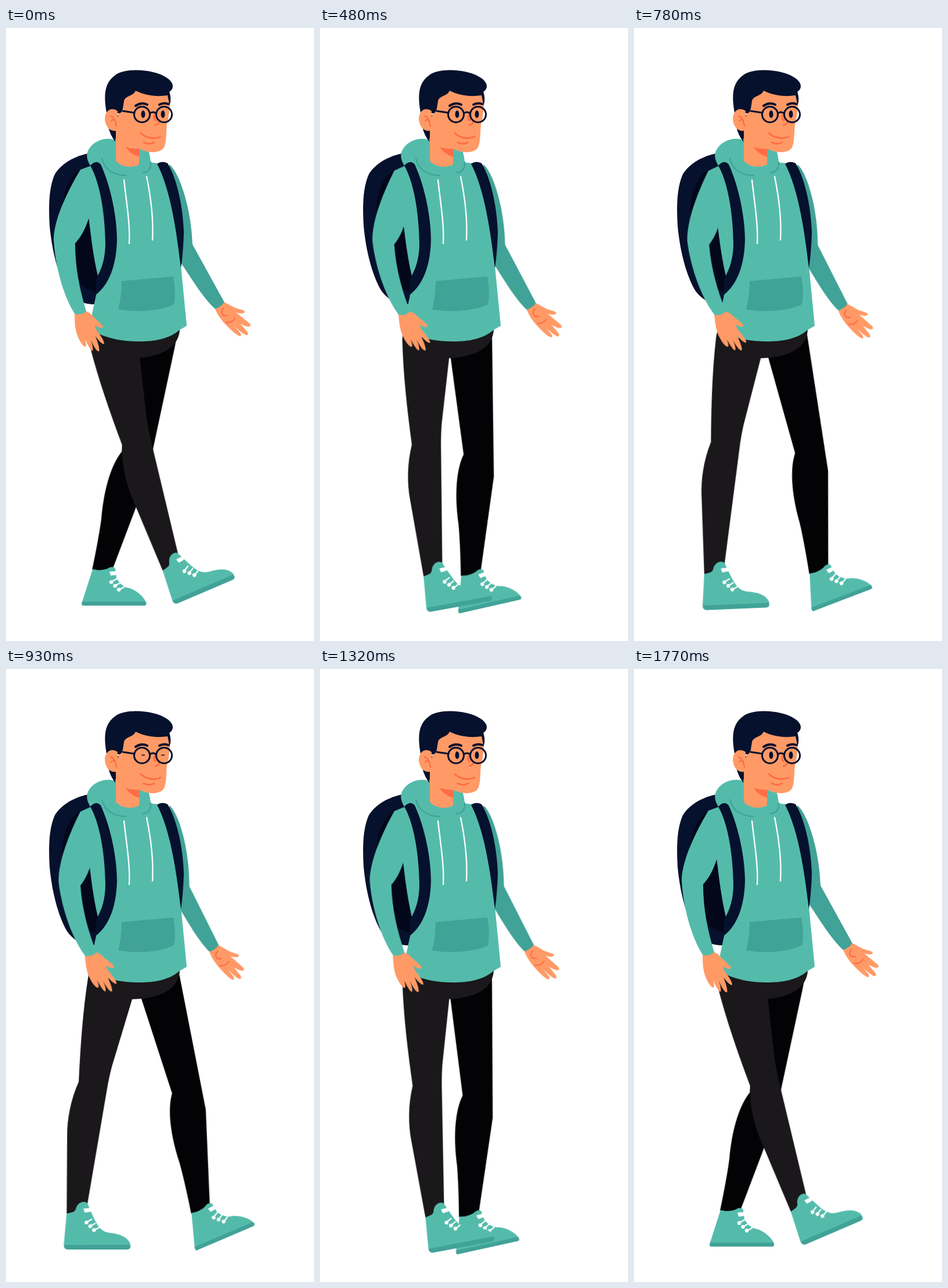
Write an HTML page that moves like this. It is 530 px wide and 1056 px high and loops after 1.8 s.

```html
<!DOCTYPE html>
<html lang="en">
<head>
<meta charset="utf-8">
<title>Walking student</title>
<style>
  html, body { margin: 0; width: 100%; height: 100%; overflow: hidden; background: #fff; }
  svg { display: block; width: 530px; height: 1056px; }

  .teal { fill: #54bbab; }
  .shade { fill: #41a297; }
  .navy { fill: #06112d; }
  .deep { fill: #03071a; }
  .skin { fill: #ff9a66; }
  .near-cloth { fill: #1a181a; }
  .far-cloth { fill: #030305; }
  .line { fill: none; stroke-linecap: round; stroke-linejoin: round; stroke-width: 3; }
  .thin { stroke-width: 2.3; }
  .thick { stroke-width: 4; }
  .fold { stroke: #41a297; }
  .blush { stroke: #ff6c46; }
  .ink { stroke: #06112d; }
  .white { stroke: #fff; }

  .leg, .arm, .eyes { animation: 1800ms infinite; }
  .leg { animation-name: stride; animation-timing-function: linear; }
  .arm { animation-timing-function: cubic-bezier(.3333, 0, .6667, 1); }
  .near.leg { --start: -23.2deg; --end: .8deg; transform-origin: 179px 532.5px; }
  .far.leg { --start: 23.2deg; --end: -.8deg; transform-origin: 246px 519px; }
  .near.arm { animation-name: near-arm; transform-origin: 151px 246px; }
  .far.arm { animation-name: far-arm; transform-origin: 283px 240px; }
  .eyes { animation-name: blink; animation-timing-function: linear; transform-origin: 253px 148.5px; }

  @keyframes stride {
    0%, 98.333%, 100% { transform: rotate(var(--start)); }
    50% { transform: rotate(var(--end)); }
  }
  @keyframes near-arm {
    0%, 98.333%, 100% { transform: rotate(0deg); }
    36.667% { transform: rotate(-4.85deg); }
  }
  @keyframes far-arm {
    0%, 98.333%, 100% { transform: rotate(0deg); }
    61.667% { transform: rotate(2.5deg); }
  }
  @keyframes blink {
    0%, 46.667%, 56.667%, 100% { transform: scaleY(1); }
    51.667% { transform: scaleY(.15); }
  }
</style>
</head>
<body>
<svg viewBox="0 0 530 1056">
  <defs>
    <path id="tag" fill="#fff" d="M133 929.500L145 928.500L145.500 935L135 936.500Z"/>
    <g id="laces">
      <path class="line thin white" d="M138 953L147 948M144 960L153 955M151 967L160 962"/>
      <g fill="#fff"><circle cx="138" cy="953.500" r="3.200"/><circle cx="144.500" cy="960" r="3.200"/><circle cx="151" cy="966.500" r="3.200"/></g>
    </g>
  </defs>

  <!-- backpack -->
  <path class="navy" d="M142 216C112 222 92 238 84 252C74 274 73 305 75 340C79 385 90 425 104 450C114 466 130 476 152 476L162 450L165 240Z"/>
  <path class="deep" d="M130 243C108 256 98 282 97 315C98 370 110 415 131 443Q142 453 160 455V240Z"/>

  <g class="far arm">
    <path class="skin" d="M360 484C364 495 373 506 382 515C390 523 398 530 403 531Q406 529 403 525L393 514C401 521 410 529 415 529Q418 527 415 523L403 509C410 513 417 516 420 514Q422 511 418 508L396 490C402 492 410 493 411 489C410 485 400 485 390 480C384 476 380 475 375 472Z"/>
    <path class="line thin blush" d="M374 483C367 491 374 498 381 495M379 507C386 508 391 505 394 500"/>
    <path class="shade" d="M281 235C298 248 319 310 321 373L375.500 472Q371 480 360 484C340 466 320 433 302 406L280 300Z"/>
  </g>

  <g class="far leg">
    <path class="far-cloth" d="M290 490L299 530L344 759L351 922L345 940L319 938C314 912 306 876 299 851C281 796 279 755 286 731L233 568L225 510Z"/>
    <g transform="rotate(-23.2 246 519)">
      <path class="teal" d="M149 932C158 935 168 934 175 931C181 927 187 928 188 932L190 948C198 961 205 964 213 965C228 971 239 982 241 991H130Z"/>
      <path class="shade" d="M131 988H240Q244 995 236 995H132Q129 995 131 988Z"/>
      <use href="#tag" x="45" y="7"/>
      <use href="#laces" x="43" y="1"/>
    </g>
  </g>

  <path class="near-cloth" d="M160 500H299V520C297 548 272 568 215 569L175 560Z"/>

  <g class="near leg">
    <path class="near-cloth" d="M160 505Q143 515 141 533C132 591 128 650 125 711C111 742 105 775 105 803L104 945H136L140 920L175 716Q178 700 182 685L217 569L230 530Z"/>
    <path class="teal" d="M104 938C112 936 119 936 120 929C124 917 136 915 140 921C143 928 146 936 150 944C156 958 163 969 176 971C197 973 211 980 214 992H99Z"/>
    <path class="shade" d="M99 992H213Q216 1000 206 1000H106Q99 1000 99 992Z"/>
    <use href="#tag"/>
    <use href="#laces"/>
  </g>

  <!-- hoodie -->
  <path class="teal" d="M146 237L190 225L262 233L278 233C296 262 305 315 304 352L301 410L311 513L299 520C280 536 256 540 228 540C204 540 180 536 160 527Q150 514 148 493L155 460L158 427C149 388 146 355 142 325L140 245Z"/>
  <path class="shade" d="M199 436L288 428Q293 456 289 476C265 488 227 490 193 485Q199 461 199 436Z"/>
  <path class="navy" d="M260 234Q268 228 278 233C296 262 305 315 306 352Q305 386 301 414C294 355 284 280 260 234Z"/>

  <g class="near arm">
    <path class="skin" d="M118 490C118 508 119 520 123 530C126 538 132 549 137 549Q139 547 136 536C140 545 146 557 149 556Q151 552 146 537C150 547 156 558 160 557Q162 552 154 531C159 538 166 546 169 544Q169 538 157 522L152 512C158 515 165 519 167 515C165 509 155 503 150 497Q144 490 138 488Z"/>
    <path class="teal" d="M128 244C108 278 84 325 82 362C84 410 99 462 118 492Q129 496 138 488C127 450 119 415 119 371C130 359 137 344 142 329L160 310L162 255L147 237Z"/>
  </g>

  <path class="teal" d="M145 237C135 221 139 210 150 200C163 190 181 188 191 195L215 225L228 203L244 208C247 215 249 226 249 235C248 247 241 250 234 250L200 255Z"/>
  <path class="navy" d="M145 237Q155 226 163 235C181 274 191 328 191 365C190 408 178 442 154 460L155 432C166 413 171 395 171 370C170 315 161 265 145 237Z"/>
  <path class="line thin fold" d="M165 225C170 246 188 254 206 254M249 231C250 243 244 249 235 249"/>
  <path class="line thin white" d="M203 262C207 298 214 340 212 371M242 256C250 295 254 330 252 365"/>

  <!-- head -->
  <path class="navy" d="M176 170Q179 184 188 196L194 150H174Z"/>
  <path class="skin" d="M189 165V229C199 240 217 242 229 235V208C242 215 258 216 268 210C277 204 275 184 277 166C281 152 283 132 282 110L224 104L202 118Z"/>
  <path fill="#ff6c46" d="M206 205Q218 209 229 208V222Q213 217 206 205Z"/>
  <path class="navy" d="M173 146C167 112 171 94 187 82C201 70 233 71 253 76C274 81 287 91 287 100Q287 106 281 110C284 119 284 127 281 134Q280 124 278 116C258 119 239 116 223 108C219 118 205 116 203 126C201 138 201 147 194 147H185Z"/>
  <path class="skin" d="M192 143C181 135 170 142 170 157C171 170 180 181 192 176Z"/>
  <path class="line thin blush" d="M180 152Q187 152 190 169M181 160Q184 157 188 159"/>
  <path class="line blush" d="M256 149Q253 157 258 159M264 161Q262 167 257 167"/>
  <path class="line blush" d="M232 181C241 190 257 192 266 187M237 197Q246 202 255 197"/>
  <path class="line thick ink" d="M223 134Q233 127 243 132M264 132Q271 128 279 131"/>
  <g class="navy eyes">
    <ellipse cx="236" cy="148.500" rx="3.500" ry="6.500"/>
    <ellipse cx="270" cy="148.500" rx="3.500" ry="6.500"/>
  </g>
  <g class="line ink">
    <circle cx="234" cy="149" r="13.500"/>
    <circle cx="272" cy="149" r="13.500"/>
    <path d="M247.500 147Q253 143 258.500 147M201 143L221 146"/>
  </g>
</svg>
</body>
</html>
```
